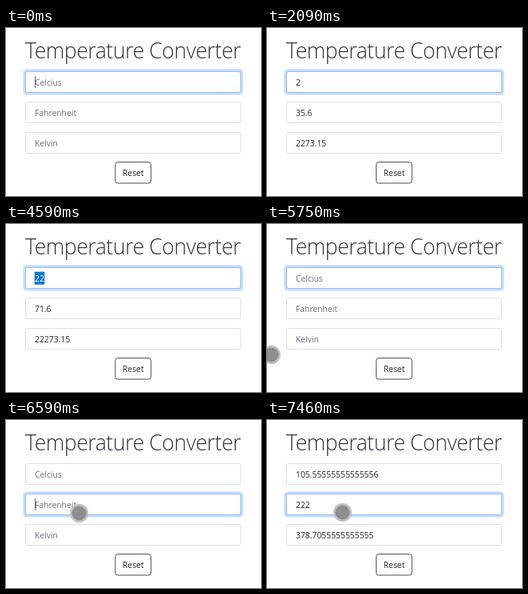
An HTML page for the animation above (8 s loop, 319 by 210 pixels).

```html
<!DOCTYPE html>
<html lang="en">
<head>
<meta charset="utf-8">
<title>Temperature Converter</title>
<style>
  html, body { margin: 0; width: 100%; height: 100%; overflow: hidden; background: #fff; }
  svg { display: block; width: 319px; height: 210px; }
  text { font: 10.35px "Open Sans", "Noto Sans", sans-serif; fill: #212529; white-space: pre; }
  .title { font-size: 26.6px; font-weight: 300; letter-spacing: -.45px; fill: #30343a; }
  .hint { fill: #68727a; }
  .marked { fill: #fff; }
  .box { fill: #fff; stroke: #dce0e5; }
  .glow { fill: #c3dbff; }
  .ring { fill: none; stroke: #94c0fe; }
</style>
</head>
<body>
<svg id="stage" viewBox="0 0 319 210">
  <text class="title" x="24" y="38">Temperature Converter</text>
  <g id="fields"></g>
  <rect x="136.7" y="167.6" width="44.6" height="26.4" rx="3" fill="#fff" stroke="#4a4f55"/>
  <text x="159" y="185" text-anchor="middle">Reset</text>
  <rect id="caret" y="60" width="1" height="15" fill="#6a6a6a"/>
  <g id="pointer">
    <circle r="11.5" fill="#bfbfbf"/>
    <circle r="9" fill="#8e8e8e"/>
  </g>
</svg>
<script>
const LOOP = 8000, LEFT = 36, DIGIT = 5.85, ROW = 38;
const $ = id => document.getElementById(id);
const hints = ["Celcius", "Fahrenheit", "Kelvin"];

// time, focused row, typed text, caret visible, text selected
const steps = [
  [0, 0, "", 1], [170, 0, "1", 1], [320, 0, "11", 1], [800, 0, "11", 0],
  [1270, 0, "1", 1], [1440, 0, "", 1], [1610, 0, "2", 1], [2090, 0, "2", 0],
  [2620, 0, "2", 1], [2870, 0, "", 1], [3100, 0, "2", 1], [3330, 0, "22", 1],
  [3810, 0, "22", 0], [4360, 0, "22", 1], [4590, 0, "22", 0, 1],
  [4890, 0, "", 1], [5350, 0, "", 0], [5900, 0, "", 1],
  [6510, 1, "", 1], [6670, 1, "2", 1], [6820, 1, "22", 1],
  [6990, 1, "222", 1], [7460, 1, "222", 0]
];

function add(parent, tag, attrs) {
  const el = document.createElementNS("http://www.w3.org/2000/svg", tag);
  for (const k in attrs) el.setAttribute(k, attrs[k]);
  return parent.appendChild(el);
}

const rows = hints.map((hint, i) => {
  const g = add($("fields"), "g", { transform: `translate(0 ${i * ROW})` });
  const frame = { x: 24.5, y: 54.5, width: 269, height: 26, rx: 2.5 };
  const glow = add(g, "rect", { class: "glow", x: 21.4, y: 51.4, width: 275.2, height: 32.2, rx: 5 });
  add(g, "rect", { class: "box", ...frame });
  const ring = add(g, "rect", { class: "ring", ...frame });
  const mark = add(g, "rect", { x: 35.7, y: 59.7, width: 12.5, height: 16, fill: "#0078d7" });
  const text = add(g, "text", { x: LEFT, y: 72 });
  return { glow, ring, mark, text };
});

// Kelvin joins typed Celsius as a string, so "1" gives 1273.15
function convert(row, typed) {
  if (!typed) return ["", "", ""];
  if (row === 0) return [typed, String(typed * 9 / 5 + 32), typed + "273.15"];
  const c = (typed - 32) * 5 / 9;
  return [String(c), typed, String(c + 273.15)];
}

function pointerAt(t) {
  if (t < 5750) return null;
  if (t >= 7310) return [94.5, 115.5];
  if (t >= 7140) return [93.5, 116];
  if (t >= 6130) return [91.5, 116.5];
  const p = Math.min(1, Math.floor((t - 5750 + 1) / 75) / 4);
  const e = 1 - (1 - p) ** 2;
  return [5.5 + 86 * e, 163.5 - 46 * e];
}

function draw(t) {
  const [, focus, typed, caret, selected] = steps.findLast(s => s[0] <= t);
  const values = convert(focus, typed);
  const fade = t >= 6510 && t < 6590 ? 0.5 : 1;

  rows.forEach((r, i) => {
    const lit = i === focus ? fade : focus === 1 && i === 0 ? 1 - fade : 0;
    r.glow.setAttribute("opacity", lit);
    r.ring.setAttribute("opacity", lit);
    const on = selected && i === focus;
    r.mark.setAttribute("visibility", on ? "visible" : "hidden");
    r.text.textContent = values[i] || hints[i];
    r.text.setAttribute("class", on ? "marked" : values[i] ? "" : "hint");
  });

  $("caret").setAttribute("transform", `translate(${LEFT + typed.length * DIGIT} ${focus * ROW})`);
  $("caret").setAttribute("visibility", caret ? "visible" : "hidden");

  const at = pointerAt(t);
  $("pointer").setAttribute("visibility", at ? "visible" : "hidden");
  if (at) $("pointer").setAttribute("transform", `translate(${at})`);
}

const start = performance.now();
function tick() {
  draw((performance.now() - start) % LOOP);
  requestAnimationFrame(tick);
}
tick();
</script>
</body>
</html>
```
